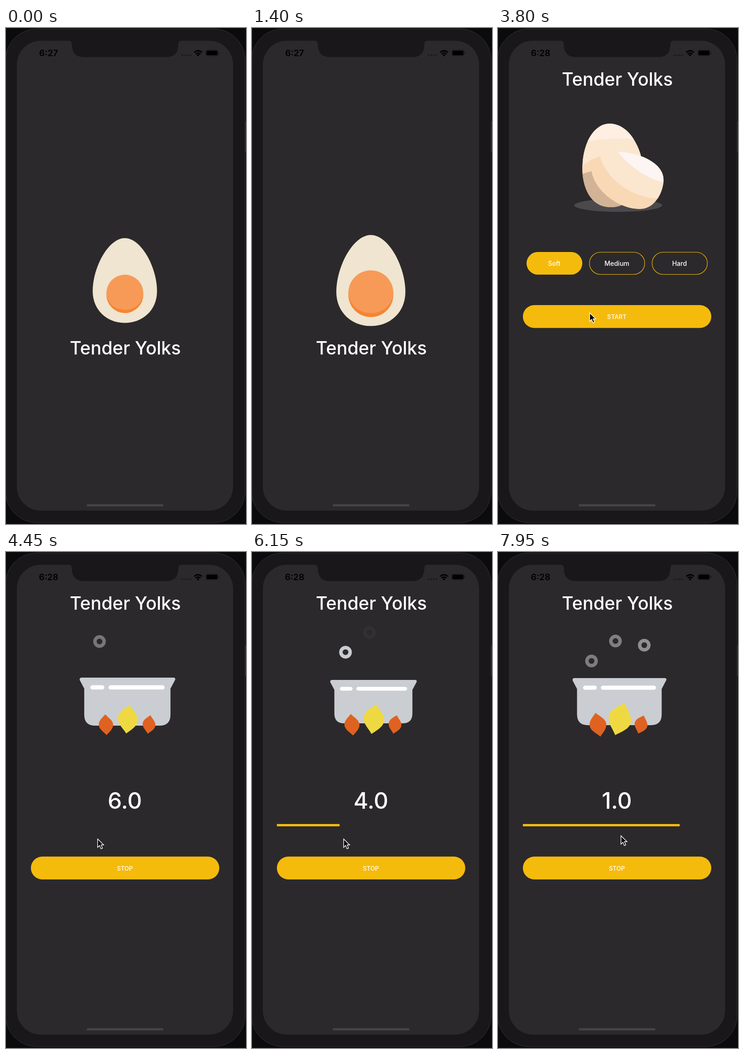
An HTML page that plays this animation: 521 by 1074 pixels, repeating every 8000 ms.

```html
<!DOCTYPE html>
<html lang="en">
<head>
<meta charset="utf-8">
<title>Egg timer</title>
<style>
  html, body { margin: 0; width: 100%; height: 100%; overflow: hidden; background: #0b0b0d; }
  svg { display: block; font-family: Inter, sans-serif; font-weight: 500; fill: #fff; }
  text { text-anchor: middle; }
  .title { font-size: 39px; }
  .label { font-size: 14px; }
  .small { font-size: 13px; }
  .gold { fill: #f5bb0c; }
  .outline { fill: none; stroke: #f5bb0c; stroke-width: 1.2; }
</style>
</head>
<body>
<svg width="521" height="1074" viewBox="0 0 521 1074">
  <defs>
    <clipPath id="screenClip"><rect x="23.500" y="27.500" width="469.500" height="1017.500" rx="52"/></clipPath>
    <path id="backShape" d="M239 207C272 207 296 238 307 272C318 320 300 388 243 388C200 388 181 345 181 300C181 250 205 207 239 207Z"/>
    <clipPath id="backClip"><use href="#backShape"/></clipPath>
    <path id="frontShape" d="M265 266C240 264 222 272 215 284C205 300 206 306 207 310C215 352 265 392 310 392C345 392 362 350 362 329C362 295 315 270 265 266Z"/>
    <clipPath id="frontClip"><use href="#frontShape"/></clipPath>
    <path id="flame" d="M0-36C9-24 25-14 25 1S10 26 0 36C-9 24-25 14-25-1S-10-26 0-36Z"/>
    <circle id="ring" r="10" fill="none" stroke="#cacdd0" stroke-width="7.5"/>
  </defs>

  <!-- Phone -->
  <rect x="516" y="202" width="6" height="67" fill="#29282a"/>
  <rect x="-1" y="2" width="520" height="1069" rx="68" fill="#19171a" stroke="#343236"/>
  <rect x="23.500" y="27.500" width="469.500" height="1017.500" rx="52" fill="#2b292b"/>
  <path d="M136 27Q143 28 143 36Q143 63 169 63H348Q374 63 374 36Q374 28 381 27Z" fill="#19171a"/>
  <rect x="175" y="1031" width="167" height="5" rx="2.5" fill="#444244"/>

  <!-- Status bar -->
  <g fill="#000">
    <text id="clock" x="92.500" y="61" font-size="19" font-weight="600"></text>
    <path d="M381 59H402" stroke="#1d1b1d" stroke-width="3.500" stroke-dasharray="3.500 2.500"/>
    <g fill="none" stroke="#000" stroke-width="2.700">
      <path d="M408.500 53Q417 45.500 425.500 53M411.700 56.500Q417 52 422.300 56.500"/>
    </g>
    <path d="M414 58.500Q417 56 420 58.500L417 62Z"/>
    <rect x="433.500" y="47.500" width="27" height="13" rx="4" fill="none" stroke="#1b191b"/>
    <rect x="435" y="49" width="24" height="10" rx="2.500"/>
    <path d="M462 52Q464 54 462 56Z"/>
  </g>

  <g clip-path="url(#screenClip)">
    <g id="splash">
      <path id="egg" fill="#efe5d0" d="M0-92C36-92 70-28 70 23C70 65 38 92 0 92S-70 65-70 23C-70-28-36-92 0-92Z"/>
      <g id="yolk">
        <circle r="40" fill="#f68533"/>
        <path d="M-40-3A40 40 0 0 1 40-3C38 19 21 33 0 33S-38 19-40-3Z" fill="#f79a57"/>
      </g>
      <text class="title" x="259" y="707">Tender Yolks</text>
    </g>

    <g id="main">
      <text class="title" x="259" y="125">Tender Yolks</text>
      <g id="menu">
        <ellipse id="shadow" cx="261" cy="384" ry="14" fill="#4b494c"/>
        <g id="back"><g clip-path="url(#backClip)">
          <use href="#backShape" fill="#fbe6d0"/>
          <path d="M170 200H330V241Q230 234 170 252Z" fill="#feefe2"/>
          <path d="M170 310Q195 285 226 275L330 290V400H170Z" fill="#f9d9b5"/>
          <path d="M170 322Q190 313 207 310L310 340V400H170Z" fill="#d2b396"/>
        </g></g>
        <g id="front"><g clip-path="url(#frontClip)">
          <use href="#frontShape" fill="#f9d9b5"/>
          <path d="M226 274C236 320 285 365 348 371H380V255H226Z" fill="#fbe6d0"/>
          <path d="M265 266C290 300 330 329 364 337V255H265Z" fill="#fdf5f3"/>
        </g></g>
        <g class="label">
          <rect class="gold" x="62" y="485" width="121" height="49" rx="24.500"/>
          <rect class="outline" x="198.500" y="485.500" width="120" height="48" rx="24"/>
          <rect class="outline" x="334.500" y="485.500" width="120" height="48" rx="24"/>
          <text x="122" y="515">Soft</text>
          <text x="258" y="515">Medium</text>
          <text x="394" y="515">Hard</text>
        </g>
        <rect class="gold" x="54" y="600" width="409" height="49.500" rx="24.700"/>
        <text class="small" x="258" y="630">START</text>
      </g>
      <g id="cooking">
        <use class="ring" href="#ring"/><use class="ring" href="#ring"/><use class="ring" href="#ring"/>
        <g id="pot">
          <path d="M171 276H357Q361 277 359 281L350 298V350Q350 372 328 372H199Q177 372 177 350V298L168 281Q167 277 171 276Z" fill="#cacdd2"/>
          <path d="M193.500 295.500H213M230 295.500H334" stroke="#fff" stroke-width="8.500" stroke-linecap="round"/>
        </g>
        <use class="flame" href="#flame" fill="#df6220"/>
        <use class="flame" href="#flame" fill="#efd943"/>
        <use class="flame" href="#flame" fill="#df6220"/>
        <text id="count" x="258" y="556" font-size="49"></text>
        <rect id="bar" class="gold" x="54" y="589" height="5"/>
        <rect class="gold" x="54" y="659.500" width="409" height="49.500" rx="24.700"/>
        <text class="small" x="258" y="689.500">STOP</text>
      </g>
    </g>
    <path id="cursor" d="M0 0V18L4.200 14L7.200 21.200L10.500 19.800L7.500 12.800H13Z" fill="#000" stroke="#fff" stroke-width="1.400"/>
  </g>
</svg>
<script>
const LOOP = 8000, PULSE = 1100, OPEN = 1800, START = 4050, TICK = 760;
const $ = id => document.getElementById(id);
const rings = document.querySelectorAll('.ring');
const flames = document.querySelectorAll('.flame');

const show = (el, on) => el.style.display = on ? '' : 'none';
const place = (el, value) => el.setAttribute('transform', value);
const clamp = v => Math.min(1, Math.max(0, v));
const mix = (a, b, k) => a + (b - a) * k;
const smooth = (t, from, to) => { const k = clamp((t - from) / (to - from)); return k * k * (3 - 2 * k); };
const wave = (t, at, degrees) => Math.sin((t - at) / PULSE * 2 * Math.PI + degrees * Math.PI / 180);
const backOut = k => 1 + 1.9 * (k - 1) ** 3 + 0.9 * (k - 1) ** 2;

// x, bottom, top, start, rise time, period, peak opacity
const steam = [
  [203, 255.5, 176, 5180, 2000, 2280, 1],
  [255, 252, 173, 5220, 950, 2020, 1],
  [317.500, 243.5, 174, 5180, 950, 2200, .75]
];
// x, y, length and angle as base plus swing
const fire = [
  [217, 374, 40, 14, 1.5, -14.5],
  [264.5, 362, 56, 18, 0, 18.5],
  [310.5, 373.5, 40, 1, 2, 17]
];

function drawSplash(t) {
  place($('egg'), `translate(258 546.8) scale(${(194.5 + 11 * wave(t, 0, -85)) / 184})`);
  place($('yolk'), `translate(258 577.2) scale(${(45.5 + 6 * wave(t, 0, -65)) / 40})`);
}

function drawMenu(t) {
  const lean = 1 - wave(t, 2400, 100);
  place($('back'), `rotate(${lean} 242 388)`);
  place($('front'), `rotate(${-1.8 * lean} 310 390)`);
  $('shadow').setAttribute('rx', 99 - 2.7 * lean);
}

function drawCooking(t) {
  steam.forEach(([x, bottom, top, start, rise, period, peak], i) => {
    const k = ((t - start) % period + period) % period / rise;
    place(rings[i], `translate(${x} ${mix(bottom, top, k)})`);
    rings[i].style.opacity = k < 1 ? peak * Math.min(1, 2.1 * Math.min(k, 1 - k)) : 0;
  });
  const size = (198 + 10 * wave(t, 5200, -37)) / 192;
  place($('pot'), `translate(264 324) scale(${size}) translate(-264 -324)`);
  const swing = .5 + .5 * wave(t, 5200, 229);
  fire.forEach(([x, y, length, grow, angle, turn], i) =>
    place(flames[i], `translate(${x} ${y}) rotate(${angle + turn * swing}) scale(${(length + grow * swing) / 72})`));
  const ticks = Math.floor((t - START) / TICK);
  $('count').textContent = (6 - ticks).toFixed(1);
  $('bar').setAttribute('width', 408.5 * ticks / 6);
}

function draw(t) {
  const opened = t >= OPEN, cooking = t >= START;
  show($('splash'), !opened);
  show($('main'), opened);
  show($('menu'), !cooking);
  show($('cooking'), cooking);
  $('clock').textContent = t < 3500 ? '6:27' : '6:28';
  if (!opened) drawSplash(t);
  else if (!cooking) drawMenu(t);
  else drawCooking(t);
  place($('main'), `translate(${-460 * (1 - backOut(clamp((t - OPEN) / 450)))} 0)`);

  const enter = smooth(t, 2950, 3600), leave = smooth(t, 7450, 7880);
  const x = mix(450, 199, enter) + 68 * leave;
  const y = mix(560, 617, enter) + 4.500 * smooth(t, 3850, 4050) - 7 * leave;
  show($('cursor'), t >= 2950);
  place($('cursor'), `translate(${x} ${y})`);
}

function frame(now) {
  draw(now % LOOP);
  requestAnimationFrame(frame);
}
requestAnimationFrame(frame);
</script>
</body>
</html>
```
